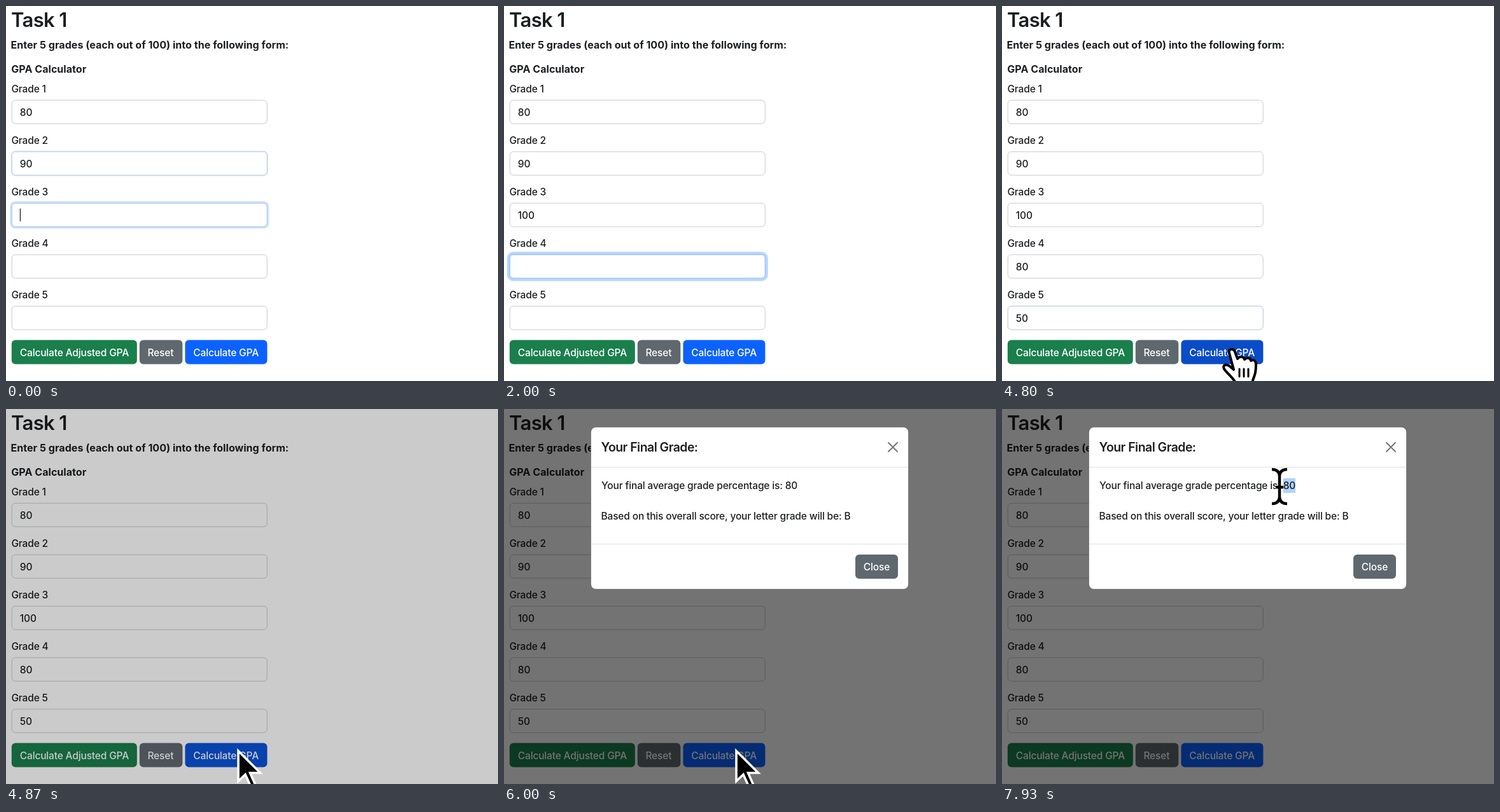
An HTML page for the animation above (8000 ms loop, 773x590 px).

```html
<!DOCTYPE html>
<html lang="en">
<head>
<meta charset="utf-8">
<title>GPA Calculator</title>
<style>
  html, body { margin: 0; width: 100%; height: 100%; overflow: hidden; background: #fff; }
  svg { display: block; width: 100%; height: 100%; }
  text { font: 450 15.5px Inter, "Open Sans", sans-serif; letter-spacing: -.16px; fill: #1c1f22; white-space: pre; }
  .title { font-size: 31px; font-weight: 600; letter-spacing: -.65px; }
  .bold { font-size: 16px; font-weight: 700; letter-spacing: .05px; }
  .modal-title { font-size: 19.4px; font-weight: 600; letter-spacing: -.5px; }
  .button { fill: #fff; }
  .rule { stroke: #dee2e6; }
</style>
</head>
<body>
<svg viewBox="0 0 773 590">
  <text class="title" x="8" y="33">Task 1</text>
  <text class="bold" x="7.5" y="66.5">Enter 5 grades (each out of 100) into the following form:</text>
  <text class="bold" x="8.3" y="105">GPA Calculator</text>
  <g id="fields"></g>

  <rect x="8.8" y="525.6" width="197" height="38" rx="6" fill="#1a7f4c"/>
  <text class="button" x="21.8" y="550.5">Calculate Adjusted GPA</text>
  <rect x="209.8" y="525.6" width="67.5" height="38" rx="6" fill="#60686f"/>
  <text class="button" x="222.4" y="550.5">Reset</text>
  <rect id="submit" x="281.4" y="525.6" width="129" height="38" rx="6"/>
  <text class="button" x="294.3" y="550.5">Calculate GPA</text>

  <rect id="backdrop" width="773" height="590"/>

  <g id="modal">
    <rect x="136.5" y="28.5" width="499" height="255" rx="8" fill="#fff" stroke="#000" stroke-opacity=".3"/>
    <path class="rule" d="M137 91.5H635M137 212.5H635"/>
    <text class="modal-title" x="152.5" y="67">Your Final Grade:</text>
    <path d="M604 53L618 67M618 53L604 67" stroke="#777" stroke-width="2" stroke-linecap="round"/>
    <rect id="selection" y="109" height="23" fill="#b0d3fd"/>
    <text id="result" x="153" y="126">Your final average grade percentage is: 80</text>
    <text x="152.5" y="174">Based on this overall score, your letter grade will be: B</text>
    <rect x="552" y="229" width="67" height="38" rx="6" fill="#60686f"/>
    <text class="button" x="564.8" y="254">Close</text>
  </g>

  <defs>
    <path id="beamShape" d="M-12 -27Q-1 -27 0 -17Q1 -27 12 -27M0 -17V17M-12 27Q-1 27 0 17Q1 27 12 27M-6 1H6"/>
  </defs>
  <g id="pointer">
    <path id="arrow" d="M2 5V52.5L13 42L23 64L30 61L20.5 39.5H36.5Z" stroke="#fff" stroke-width="3.6"/>
    <g id="hand" stroke="#000" stroke-linecap="round" stroke-linejoin="round">
      <path d="M-6 13C-8 6 1 5 3 11L7 22C11 17 17 19 18 23C22 19 28 21 28 25C33 22 36 26 36 31C36 44 34 48 31 56V64H3V58C-2 50 -11 43 -14 38C-17 32 -11 29 -5 34L1 39Z"
        fill="#fff" stroke-width="4"/>
      <path d="M10 38V50M17 38V50M24 38V50" stroke-width="3"/>
    </g>
    <g id="beam" fill="none">
      <use href="#beamShape" stroke="#fff" stroke-width="6.5"/>
      <use href="#beamShape" stroke="#000" stroke-width="4.5"/>
    </g>
  </g>
</svg>
<script>
const LOOP = 8000, FADE = 150;
const VALUES = ['80', '90', '100', '80', '50'];
// Time of each keystroke; the first two fields are already filled.
const KEYS = [[], [], [480, 640, 760], [2120, 2240], [2830, 2990]];
// Time each field gains focus; the last entry is the final blur.
const FOCUS = [-2000, -1000, -90, 1420, 2480, 4690];
const BACKDROP_AT = 4815, MODAL_AT = 4985, SLIDE = 335;
// Pointer stops: time, x, y
const STOPS = [
  [3650, 370, 640], [4250, 363, 533], [6470, 363, 533], [7200, 455, 250],
  [7400, 455, 250], [7620, 463, 122], [7680, 463, 122], [7900, 436, 122]
];

const $ = id => document.getElementById(id);
const clamp = v => Math.max(0, Math.min(1, v));
const smooth = v => { v = clamp(v); return v * v * (3 - 2 * v); };
const lerp = (a, b, k) => a + (b - a) * k;
const mix = (a, b, k) => `rgb(${a.map((v, i) => Math.round(lerp(v, b[i], k)))})`;
const show = (el, on) => el.setAttribute('visibility', on ? 'visible' : 'hidden');
function set(el, attrs) {
  for (const name in attrs) el.setAttribute(name, attrs[name]);
  return el;
}
function add(tag, attrs) {
  const el = document.createElementNS('http://www.w3.org/2000/svg', tag);
  return $('fields').appendChild(set(el, attrs));
}

const LEFT = 8.7;
const fields = VALUES.map((_, i) => {
  const y = 147.7 + 81 * i;
  add('text', { x: 8.4, y: y - 11.7 }).textContent = `Grade ${i + 1}`;
  return {
    y,
    ring: add('rect', { fill: '#0d6efd' }),
    box: add('rect', { x: LEFT + .5, y: y + .5, width: 401, height: 37, rx: 5.5, fill: '#fff' }),
    value: add('text', { x: 21.8, y: y + 25 }),
    caret: add('rect', { y: y + 9, width: 1.2, height: 20, fill: '#111' })
  };
});

function drawField(field, i, t) {
  const k = smooth((t - FOCUS[i]) / FADE) * (1 - smooth((t - FOCUS[i + 1]) / FADE));
  const spread = 4 * k;
  set(field.ring, {
    x: LEFT - spread, y: field.y - spread, width: 402 + 2 * spread, height: 38 + 2 * spread,
    rx: 6 + spread, opacity: .29 * k
  });
  set(field.box, { stroke: mix([198, 202, 207], [134, 183, 254], k) });

  const typed = KEYS[i].filter(at => at <= t);
  const text = KEYS[i].length ? VALUES[i].slice(0, typed.length) : VALUES[i];
  if (field.value.textContent !== text) field.value.textContent = text;

  const active = t >= FOCUS[i] && t < FOCUS[i + 1];
  const lastInput = Math.max(FOCUS[i], ...typed);
  show(field.caret, active && (t - lastInput) % 1000 < 500);
  set(field.caret, { x: 21.8 + (text ? field.value.getComputedTextLength() : 0) });
}

function pointerAt(t) {
  const next = STOPS.findIndex(stop => stop[0] > t);
  if (next === 0) return STOPS[0].slice(1);
  if (next < 0) return STOPS.at(-1).slice(1);
  const [t0, x0, y0] = STOPS[next - 1], [t1, x1, y1] = STOPS[next];
  const k = smooth((t - t0) / (t1 - t0));
  return [lerp(x0, x1, k), lerp(y0, y1, k)];
}

function drawPointer(t) {
  const [x, y] = pointerAt(t);
  const hand = t < BACKDROP_AT && y < 564;
  const beam = t > 7400 && y < 138;
  set($('pointer'), { transform: `translate(${x} ${y})` });
  show($('hand'), hand);
  show($('beam'), beam);
  show($('arrow'), !hand && !beam);

  // Dragging leftwards selects the two digits one by one.
  const count = t < 7680 ? 0 : x < 446 ? 2 : x < 456 ? 1 : 0;
  show($('selection'), count > 0);
  if (count) {
    const result = $('result'), length = result.getNumberOfChars();
    const left = result.getStartPositionOfChar(length - count).x;
    set($('selection'), { x: left, width: result.getEndPositionOfChar(length - 1).x - left });
  }
}

function draw(t) {
  fields.forEach((field, i) => drawField(field, i, t));

  const hover = smooth((t - 4010) / FADE) * (1 - smooth((t - BACKDROP_AT) / FADE));
  set($('submit'), { fill: mix([11, 98, 254], [10, 76, 200], hover) });
  set($('backdrop'), { opacity: .55 * clamp((t - BACKDROP_AT) / FADE) });

  const slide = 1 - clamp((t - MODAL_AT) / SLIDE);
  show($('modal'), t >= MODAL_AT);
  set($('modal'), {
    opacity: clamp((t - MODAL_AT) / FADE),
    transform: `translate(0 ${-50 * slide ** 1.72})`
  });
  drawPointer(t);
}

const start = performance.now();
function frame() {
  draw((performance.now() - start) % LOOP);
  requestAnimationFrame(frame);
}
frame();
</script>
</body>
</html>
```
